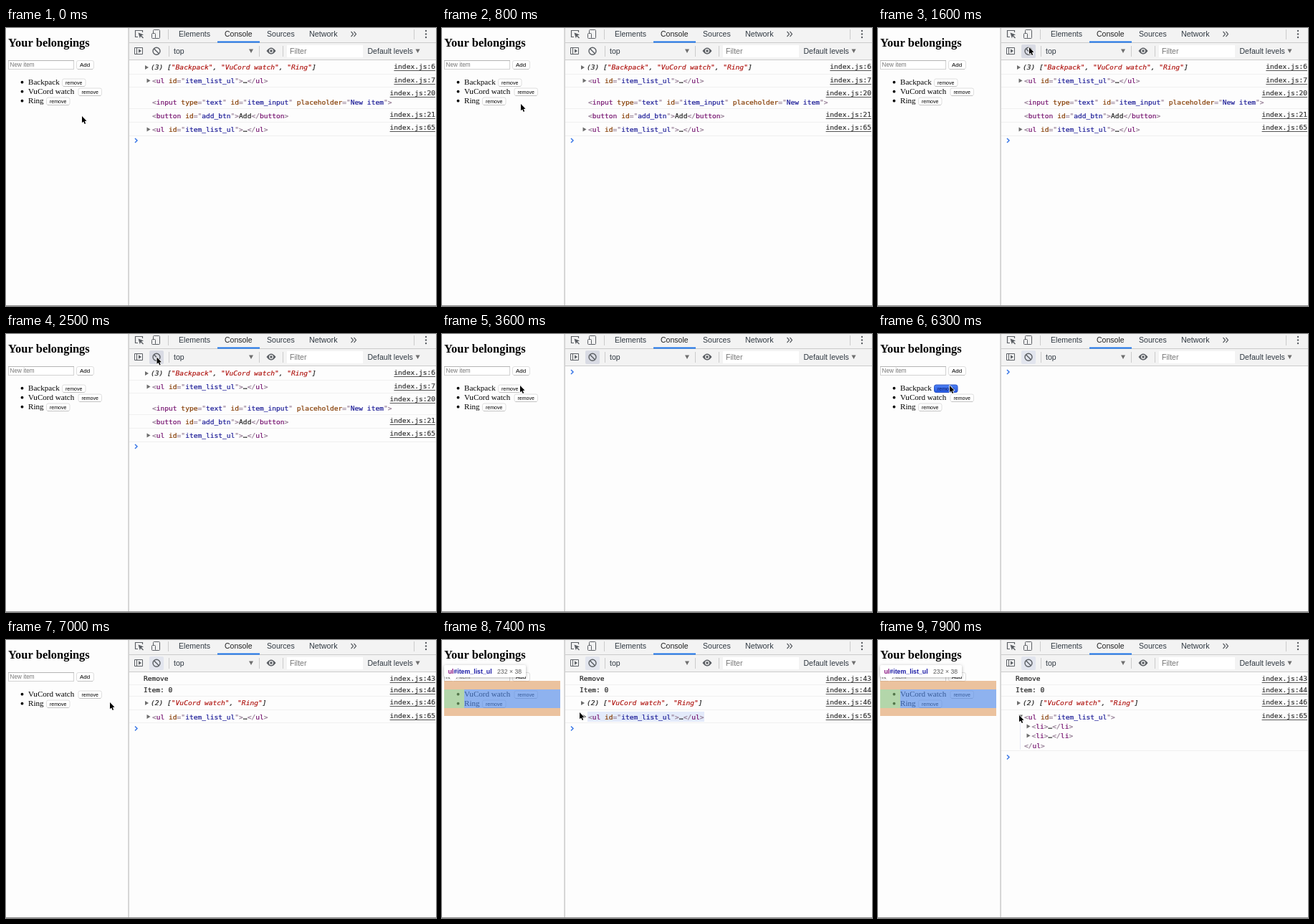
An HTML page with a canvas that plays this animation: 600x388 px, repeating every 8 s.

```html
<!DOCTYPE html>
<html lang="en">
<head>
<meta charset="utf-8">
<title>Belongings list and console</title>
<style>
html, body { margin: 0; width: 600px; height: 388px; overflow: hidden; background: #fdfdfd; }
canvas { display: block; width: 600px; height: 388px; }
</style>
</head>
<body>
<canvas id="stage" width="600" height="388"></canvas>
<script>
const ctx = document.getElementById('stage').getContext('2d');
const LOOP = 8000, STEP = 100;
const SANS = '"Liberation Sans", Arial, sans-serif';
const SERIF = '"Liberation Serif", Times, serif';
const MONO = '"DejaVu Sans Mono", Menlo, monospace';
const CODE = '9.58px ' + MONO;
const INK = '#303942', ICON = '#5b5f64', LINE = '#cbcbcb';
const PUNCT = '#947c93', TAG = '#74106e', ATTR = '#843b00', VALUE = '#1a1a96', STRING = '#b01612';

// event times in ms
const HOVER_CLEAR = 1500, CLEAR = 2900, LEAVE_CLEAR = 3700, PRESS = 6200, REMOVE = 6500, INSPECT = 7200, EXPAND = 7800;

// pointer keys: time, x, y
const POINTER = [
  [0, 106, 123], [400, 106, 118], [900, 111, 103], [1500, 211, 27], [1700, 211, 27],
  [2100, 212, 30], [2500, 210.5, 32.5], [2800, 210.5, 32.5], [3300, 138, 70], [3600, 109, 72],
  [3700, 109, 72], [4200, 104, 73], [4800, 104, 73], [5200, 102, 73], [5800, 102, 73],
  [6200, 100, 72], [6700, 100, 72], [7100, 160, 92], [7400, 192, 101], [7600, 197, 105]
];

const ITEMS = [['Backpack', 78], ['VuCord watch', 100.5], ['Ring', 56]];

function text(str, x, y, font, color) {
  ctx.font = font;
  ctx.fillStyle = color;
  ctx.fillText(str, x, y);
  return x + ctx.measureText(str).width;
}

// console text is slightly heavier than the plain face
function codeText(str, x, y, color, style = '') {
  const end = text(str, x, y, style + CODE, color);
  ctx.strokeStyle = color;
  ctx.lineWidth = .2;
  ctx.strokeText(str, x, y);
  return end;
}

function rect(x, y, w, h, color) {
  ctx.fillStyle = color;
  ctx.fillRect(x, y, w, h);
}

function poly(points, fill, stroke, width = 1) {
  ctx.beginPath();
  points.forEach(([x, y]) => ctx.lineTo(x, y));
  if (fill) {
    ctx.closePath();
    ctx.fillStyle = fill;
    ctx.fill();
  }
  if (stroke) {
    ctx.strokeStyle = stroke;
    ctx.lineWidth = width;
    ctx.stroke();
  }
}

function roundBox(x, y, w, h, r, fill, stroke) {
  ctx.beginPath();
  ctx.roundRect(x, y, w, h, r);
  if (fill) { ctx.fillStyle = fill; ctx.fill(); }
  if (stroke) { ctx.strokeStyle = stroke; ctx.lineWidth = 1; ctx.stroke(); }
}

function dot(x, y, r, color) {
  ctx.beginPath();
  ctx.arc(x, y, r, 0, 7);
  ctx.fillStyle = color;
  ctx.fill();
}

// console text pieces
function openTag(name, attrs = {}) {
  const out = [['<', PUNCT], [name, TAG]];
  for (const key in attrs) out.push([' ' + key, ATTR], ['="', PUNCT], [attrs[key], VALUE], ['"', PUNCT]);
  return [...out, ['>', PUNCT]];
}
const closeTag = name => [['</', PUNCT], [name, TAG], ['>', PUNCT]];
const wrap = (name, attrs, body) => [...openTag(name, attrs), [body, '#222'], ...closeTag(name)];

function list(names) {
  const out = [[`(${names.length}) [`, '#222']];
  names.forEach((n, i) => {
    if (i) out.push([', ', '#222']);
    out.push([`"${n}"`, STRING]);
  });
  return [...out, [']', '#222']];
}

function code(parts, x, y, style) {
  for (const [str, color] of parts) x = codeText(str, x, y, color, style);
}

function link(line, y) {
  const str = 'index.js:' + line;
  ctx.font = CODE;
  const w = ctx.measureText(str).width, x = 599 - w;
  codeText(str, x, y, '#333');
  rect(x, y + 2, w, 1, '#555');
}

const arrowRight = (x, y) => poly([[x, y - 3], [x + 5, y], [x, y + 3]], '#6e6e6e');
const arrowDown = (x, y, s = 3) => poly([[x - s, y - s * .8], [x + s, y - s * .8], [x, y + s]], '#6e6e6e');
const rule = y => rect(172, y, 428, 1, '#f0f0f0');
const prompt = y => poly([[180, y - 3], [183, y], [180, y + 3]], null, '#3b78e7', 1.5);

function button(label, x, y, w, h, size, pressed) {
  if (pressed) {
    const g = ctx.createLinearGradient(0, y, 0, y + h);
    g.addColorStop(0, '#4f83f5');
    g.addColorStop(1, '#2456e0');
    roundBox(x + .5, y + .5, w - 1, h - 1, 2.5, g, '#2f55c4');
  } else {
    roundBox(x + .5, y + .5, w - 1, h - 1, 2.5, '#fff', '#dedede');
    rect(x + 2, y + h - 1, w - 4, 1, '#c2c2c2');
  }
  text(label, x + 5, y + h / 2 + size * .34, size + 'px ' + SANS, pressed ? '#0c1c66' : '#000');
}

function drawPage(t) {
  text('Your belongings', 3, 26, 'bold 16.45px ' + SERIF, '#000');
  rect(3, 45, 92, 13, '#d2d2d2');
  rect(4, 46, 90, 11, '#fff');
  rect(3, 45, 92, 1, '#b4b4b4');
  text('New item', 5.5, 54, '8.2px ' + SANS, '#777');
  button('Add', 98, 45, 25, 13, 8);

  const shown = t < REMOVE ? ITEMS : ITEMS.slice(1);
  shown.forEach(([name, bx], i) => {
    const y = 78.7 + 13 * i;
    dot(22.5, y - 3, 1.9, '#000');
    text(name, 31, y, '11.1px ' + SERIF, '#000');
    button('remove', bx, 70.5 + 13 * i, 33.5, 11.5, 7, i === 0 && t >= PRESS && t < REMOVE);
  });
  if (t >= INSPECT) drawInspect();
}

function drawInspect() {
  const margin = 'rgba(226,164,110,.66)';
  rect(3, 57, 162, 12, margin);
  rect(3, 95, 162, 11, margin);
  rect(3, 69, 28, 26, 'rgba(135,190,120,.62)');
  rect(31, 69, 134, 26, 'rgba(85,140,232,.66)');

  ctx.save();
  ctx.shadowColor = 'rgba(0,0,0,.3)';
  ctx.shadowBlur = 4;
  ctx.shadowOffsetY = 1;
  roundBox(3, 35, 114, 17, 2, '#fff');
  ctx.restore();
  poly([[10, 52], [21, 52], [15.5, 57.5]], '#fff');
  const x = text('ul', 8.5, 47, 'bold 8.8px ' + SANS, '#881280');
  text('#item_list_ul', x, 47, 'bold 8.8px ' + SANS, '#1a1aa6');
  text('232 × 38', 77, 47, '8.7px ' + SANS, '#5a5a5a');
}

function drawToolbar(t) {
  rect(172, 0, 428, 44, '#f3f3f3');
  rect(172, 20, 428, 1, LINE);
  rect(172, 44, 428, 1, LINE);
  const ui = '10.55px ' + SANS;

  // inspect and device icons
  poly([[184, 12.5], [180.5, 12.5], [180.5, 3.5], [190.5, 3.5], [190.5, 6]], null, ICON, 1.2);
  poly([[184.5, 6.5], [192, 9.3], [189, 10.5], [192, 13.5], [191, 14.5], [188, 11.5], [186.8, 14.3]], ICON);
  roundBox(205.5, 2.5, 9, 12, 1, null, ICON);
  roundBox(203.5, 7.5, 5, 7, 1, '#f3f3f3', ICON);
  rect(226, 2, 1, 14, LINE);

  text('Elements', 241, 12, ui, INK);
  text('Console', 305, 12, ui, '#222');
  text('Sources', 364, 12, ui, INK);
  text('Network', 423, 12, '10.8px ' + SANS, INK);
  rect(295, 18.5, 59, 2, '#1a73e8');
  for (const x of [481.5, 485.5]) poly([[x, 5], [x + 3, 8.5], [x, 12]], null, ICON, 1.2);
  rect(569, 2, 1, 14, LINE);
  for (const y of [4, 8.5, 13]) dot(586, y, 1.2, ICON);

  // sidebar icon
  roundBox(179.5, 27.5, 11, 9, 0, null, ICON);
  rect(182, 28, 1, 9, ICON);
  poly([[185, 29.3], [189, 32], [185, 34.7]], ICON);

  // clear icon
  if (t >= HOVER_CLEAR) roundBox(200, 23, 20, 19, 2, t < LEAVE_CLEAR ? '#d9dbe4' : '#e2e5ee');
  ctx.beginPath();
  ctx.arc(210, 32.3, 5, 0, 7);
  ctx.strokeStyle = ICON;
  ctx.lineWidth = 1.4;
  ctx.stroke();
  poly([[206.6, 28.9], [213.4, 35.7]], null, ICON, 1.4);
  rect(227, 25, 1, 15, LINE);

  text('top', 234, 36, ui, INK);
  arrowDown(342, 32);
  rect(353, 25, 1, 15, LINE);
  ctx.beginPath();
  ctx.moveTo(363.5, 32);
  ctx.quadraticCurveTo(370, 23, 376.5, 32);
  ctx.quadraticCurveTo(370, 41, 363.5, 32);
  ctx.fillStyle = ICON;
  ctx.fill();
  dot(370, 32, 3, '#f3f3f3');
  dot(370, 32, 1.8, ICON);
  rect(386, 25, 1, 15, LINE);

  rect(392, 24, 106, 17, '#fff');
  text('Filter', 396, 36, ui, '#757575');
  text('Default levels', 504.5, 36, ui, INK);
  arrowDown(574.5, 32);
}

function drawFirstLog() {
  [64, 82, 112, 131, 150].forEach(rule);
  arrowRight(194, 55);
  code(list(ITEMS.map(i => i[0])), 202, 58, 'italic ');
  arrowRight(196.5, 73.5);
  const ul = wrap('ul', { id: 'item_list_ul' }, '…');
  code(ul, 204, 77);
  code(openTag('input', { type: 'text', id: 'item_input', placeholder: 'New item' }), 204, 107);
  code(wrap('button', { id: 'add_btn' }, 'Add'), 204, 126);
  arrowRight(196.5, 141.5);
  code(ul, 204, 145);
  link(6, 57);
  link(7, 76);
  link(20, 94);
  link(21, 124);
  link(65, 142);
  prompt(157);
}

function drawSecondLog(t) {
  const open = t >= EXPAND;
  [62, 78, 97, open ? 154 : 115].forEach(rule);
  code([['Remove', '#222']], 192, 57);
  code([['Item: 0', '#222']], 192, 73);
  arrowRight(194, 88);
  code(list(ITEMS.slice(1).map(i => i[0])), 202, 91, 'italic ');
  if (t >= INSPECT && !open) rect(203, 100, 163, 14, '#e3eafa');
  if (open) {
    arrowDown(199, 107);
    rect(198, 113, 1, 40, '#e6e8f4');
    code(openTag('ul', { id: 'item_list_ul' }), 204, 110.5);
    for (const y of [120.5, 133.5]) {
      arrowRight(207.5, y);
      code(wrap('li', {}, '…'), 214.5, y + 3.5);
    }
    code(closeTag('ul'), 204, 151);
  } else {
    arrowRight(196.5, 107);
    code(wrap('ul', { id: 'item_list_ul' }, '…'), 204, 110.5);
  }
  link(43, 57);
  link(44, 73);
  link(46, 90);
  link(65, 109);
  prompt(open ? 163.5 : 123.5);
}

function drawPointer(t) {
  let i = POINTER.findIndex(k => k[0] > t);
  if (i < 0) i = POINTER.length;
  const a = POINTER[i - 1], b = POINTER[i] || a;
  const p = b === a ? 0 : (t - a[0]) / (b[0] - a[0]);
  ctx.save();
  ctx.translate(a[1] + (b[1] - a[1]) * p, a[2] + (b[2] - a[2]) * p);
  ctx.lineJoin = 'round';
  const shape = [[0, 0], [0, 9.3], [2.1, 7.4], [3.7, 11], [5.2, 10.3], [3.7, 6.9], [6.5, 6.8], [0, 0]];
  poly(shape, '#fff', '#fff', 1.6);
  poly(shape, '#000');
  ctx.restore();
}

function draw(t) {
  rect(0, 0, 600, 388, '#fdfdfd');
  drawPage(t);
  rect(170, 0, 1, 387, '#dcdcdc');
  rect(171, 0, 1, 387, '#d0d0d0');
  drawToolbar(t);
  if (t < CLEAR) drawFirstLog();
  else if (t < REMOVE) prompt(53);
  else drawSecondLog(t);
  rect(0, 387, 600, 1, '#8c8c8c');
  drawPointer(t);
}

const start = performance.now();
function tick() {
  const t = (performance.now() - start) % LOOP;
  draw(Math.floor(t / STEP) * STEP);
  requestAnimationFrame(tick);
}
tick();
</script>
</body>
</html>
```
